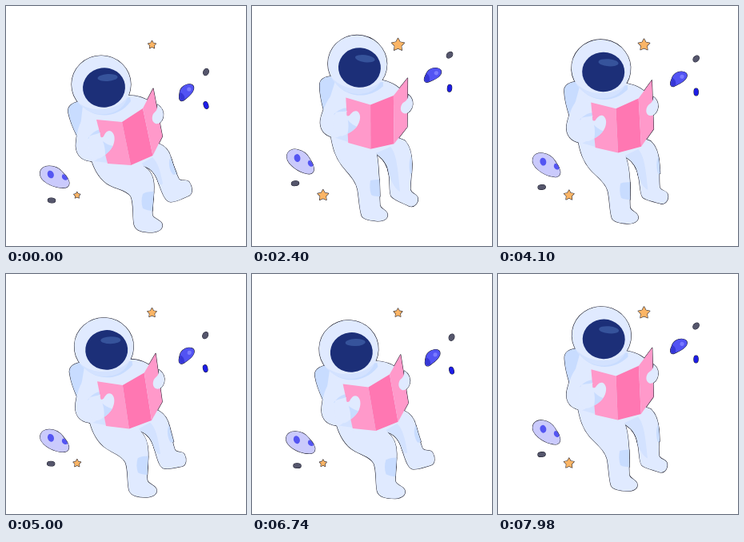
These frames come from a looping animation (300x300 px, 8000 ms). An HTML page:

```html
<!DOCTYPE html>
<html lang="en">
<head>
<meta charset="utf-8">
<title>Reading in space</title>
<style>
  html, body { margin: 0; width: 100%; height: 100%; overflow: hidden; background: #fff; }
  svg { display: block; width: 100vw; height: 100vh; }
  .suit { fill: #e0eaff; }
  .shade { fill: #c8dcff; }
  .soft { fill: #d3e2ff; }
  .pink { fill: #ff99ca; }
  .hot { fill: #ff77b2; }
  .star { fill: #fbb566; }
  .rock { fill: #55566c; }
</style>
</head>
<body>
<svg viewBox="0 0 300 300">
  <defs>
    <g id="scene">
      <path id="starA" class="star"/>
      <path id="starB" class="star"/>

      <g id="moon">
        <path fill="#cacafc" d="M42.500 209C43 203 48 200 54 200C61 200 67 203 71 208C75 213 79 217 79 221C79 227 74 228 67 227C58 226 42 219 42.500 209Z"/>
        <ellipse cx="55.800" cy="210.500" rx="3.900" ry="5" transform="rotate(-22 55.800 210.500)" fill="#5455f2"/>
        <path fill="#5455f2" d="M70.500 211C72 209 74.500 211.500 77 215.500C77 218 74 218.500 71.500 216.500C69.500 215 69.500 212.500 70.500 211Z"/>
      </g>
      <ellipse id="rockL" class="rock" cx="57" cy="243" rx="4.700" ry="2.900"/>

      <g id="planet">
        <path fill="#5253f3" d="M217 110C217 103 222 99 227 98C232 97 235.500 99 234.500 104C233 110 227 114 222 118C218 120 215.500 117 217 110Z"/>
        <path fill="#3637d6" d="M217.500 108C221 109 223.500 112 223.500 116.500C219 120 215.500 118 217.500 108Z"/>
        <circle cx="228.800" cy="104" r="2.600" fill="#7a7bff"/>
      </g>
      <ellipse id="rockR" class="rock" cx="250" cy="82.500" rx="3.200" ry="4.300"/>
      <ellipse id="dot" fill="#1d1de6" cx="250" cy="124" rx="2.700" ry="4.500"/>

      <g id="back">
        <path class="shade" d="M92 119C82 121 76 126 78 134C80 144 84 153 89 163L112 160L112 122Z"/>
      </g>
      <path id="legR" class="suit"/>
      <path id="thigh" class="soft"/>
      <path id="patchR" class="shade"/>
      <path id="legL" class="suit"/>
      <path id="patchL" class="shade"/>

      <g id="body">
        <path class="suit" d="M96 124L150 112C163 111 176 115 183 123L190 140L183 188L128 200L106 194L92 160Z"/>
        <path class="shade" d="M99 128C112 140 140 141 156 119L155 114L96 122Z"/>
        <path class="suit" d="M103 133C93 141 89 154 87.500 170C86 183 92 193 106 194C115 194 126 189 131 181L124 156L117 150Z"/>
        <path class="soft" d="M106 165C110 160 115 161 119 159L124 182L127 196L110 194C119 190 122 178 117 167Z"/>
        <path class="shade" d="M102 166C107 159 112 155 119 154L119 160C113 160 108 163 102 166Z"/>
        <path class="pink" d="M113 142L145 145L156 199L127 197Z"/>
        <path class="hot" d="M145 145L171 128L183.500 187L156 199Z"/>
        <path class="pink" d="M171 128L184 103L195.500 163L183.500 187Z"/>
        <path class="suit" d="M189 123C195 126 198 133 196.500 139C195 145 191 148 187 147C182 145 182 139 184 135C186 132 190 131 189 123Z"/>
        <path class="suit" d="M104 163C110 160 115 160 118 158C116 163 119 166 122 163C124 159 127 154 132 157C137 161 136 169 134 174C131 180 125 186 118 190C110 193 101 187 104 163Z"/>
        <path class="shade" d="M121 169C126 173 130 174 133.500 175C131 180 128 183 124 186C124 179 123 174 121 169Z"/>
        <ellipse class="suit" cx="119" cy="98" rx="37" ry="36"/>
        <path class="soft" d="M91 121C107 134 138 132 152 114C145 139 107 143 91 121Z"/>
        <ellipse cx="122.500" cy="102" rx="26.500" ry="24.800" transform="rotate(-8 122.500 102)" fill="#1c2f78"/>
        <ellipse cx="127" cy="89.500" rx="12.500" ry="4.500" transform="rotate(-4 127 89.500)" fill="#36539b"/>
      </g>
    </g>
  </defs>
  <use href="#scene" stroke="#20212f" stroke-width="1.1" stroke-linejoin="round"/>
  <use href="#scene"/>
</svg>
<script>
  const LOOP = 8000, SWAY = 6000;
  const el = id => document.getElementById(id);

  // Two poses per flexible part, blended point by point.
  const poses = {
    legL: [
      'M105 185C108 200 115 214 126 222C136 229 150 229 156 238C160 247 158 262 160 273C162 281 170 283 183 283C192 282 197 278 195 272C193 267 184 266 183 261C182 252 185 240 185 226C185 212 180 205 172 200L150 170Z',
      'M98 160C101 178 104 188 112 199C120 209 130 218 132 230C134 242 134 252 137 262C139 267 148 268 157 269C167 269 171 264 169 259C167 254 161 254 160 249C159 238 160 228 159 216C158 204 158 195 156 185L148 160Z'
    ],
    patchL: [
      'M171 235C175 232 180 232 184.700 232L183 256C179 256 175 255 171 253C169 247 169 241 171 235Z',
      'M148 218C152 217 156 217 159.300 217L160 238C156 238 152 238 149 236C147 230 147 224 148 218Z'
    ],
    legR: [
      'M150 190L172 200C183 203 188 212 191 222C195 233 199 245 206 245C213 245 222 240 229 237C234 234 233 226 229 220C226 216 219 220 216 216C212 208 209 199 206 189C204 181 199 175 191 172L170 165Z',
      'M148 175L157 186C166 193 170 200 171 210C173 220 171 232 174 238C179 243 188 246 196 250C203 253 209 245 207 239C205 234 199 235 198 229C198 220 200 207 200 197C200 186 198 176 191 168L170 160Z'
    ],
    thigh: [
      'M168 198L183 189C190 196 193 206 196 222C194 224 192 224 191 222C188 212 183 203 172 200Z',
      'M155 184L173 176C180 184 182 198 185 232C180 230 174 220 171 210C170 200 166 193 157 186Z'
    ],
    patchR: [
      'M206 189C202 194 204 206 209 211L213.500 210C211 204 208 196 206 189Z',
      'M199 188C196 191 196 205 198 210L199.600 209C200 202 200 195 199 188Z'
    ]
  };

  const number = /-?\d+(\.\d+)?/g;
  function blend([a, b], k) {
    const ends = b.match(number);
    let i = 0;
    return a.replace(number, n => (+n + (ends[i++] - n) * k).toFixed(2));
  }

  function star(cx, cy, r) {
    let d = '';
    for (let i = 0; i < 10; i++) {
      const a = i * Math.PI / 5 - Math.PI / 2, q = i % 2 ? r * 0.53 : r;
      d += (i ? 'L' : 'M') + (cx + q * Math.cos(a)).toFixed(2) + ' ' + (cy + q * Math.sin(a)).toFixed(2);
    }
    return d + 'Z';
  }

  function move(id, dx, dy, turn, cx, cy) {
    el(id).setAttribute('transform', `translate(${dx} ${dy}) rotate(${turn} ${cx} ${cy})`);
  }

  function draw(t) {
    const k = 0.5525 * (1 - Math.cos(2 * Math.PI * t / SWAY));
    for (const id in poses) el(id).setAttribute('d', blend(poses[id], k));
    for (const id of ['back', 'body']) move(id, 2 * k, -20.5 * k, 11.3 * k, 150, 150);
    move('moon', 0, -19.7 * k, 11 * k, 60, 214);
    move('rockL', -3 * k, -21.3 * k, 5 - 14 * k, 57, 243);
    move('planet', 0.5 * k, -21.3 * k, 17 * k, 225.500, 108);
    move('rockR', -3 * k, -21.3 * k, 20 + 25 * k, 250, 82.500);
    move('dot', -3 * k, -21.3 * k, -20 + 25 * k, 250, 124);
    el('starA').setAttribute('d', star(182.5, 48.6, 5.2 + 3.1 * k));
    el('starB').setAttribute('d', star(88.8, 236.6, 4.2 + 3 * k));
  }

  function tick() {
    draw(performance.now() % LOOP);
    requestAnimationFrame(tick);
  }
  tick();
</script>
</body>
</html>
```
